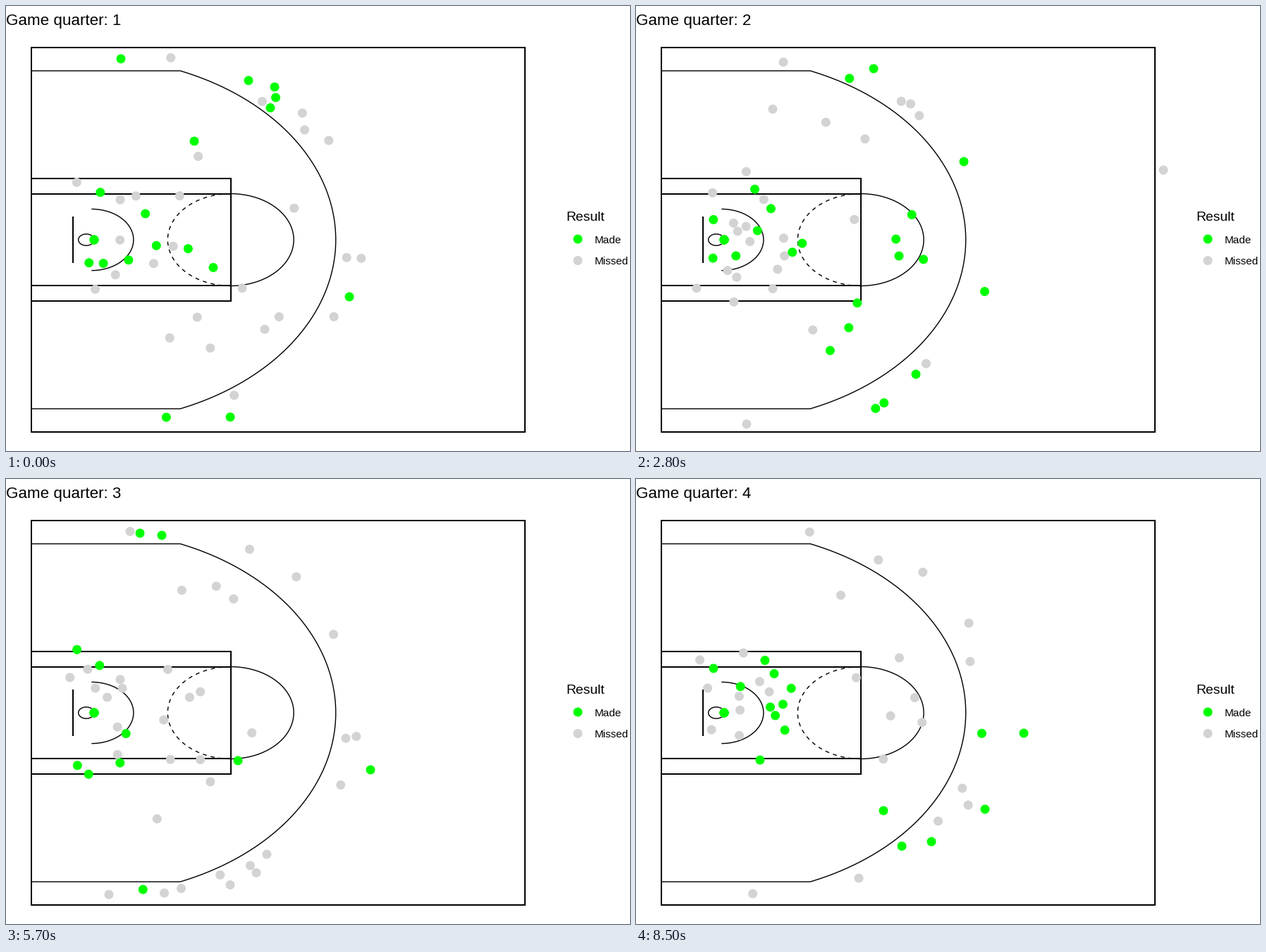
Write a matplotlib script that moves like this. It is 885x632 px and loops after 10 s.

```python
import numpy as np
import matplotlib.pyplot as plt
from matplotlib.animation import FuncAnimation

W, H, DPI = 885, 632, 128
PT = 72 / DPI                      # points per pixel
GREEN, GREY = (0, 1, 0), (211 / 255,) * 3
DOT_R, DOT_EDGE = 6.0, 0.945 * PT

FRAMES, FADE = 100, 14
STARTS = (14, 43, 71)              # last still frame before each fade

HOOP, THREE = 5.25, 23.75          # feet
rng = np.random.default_rng(23)


def to_px(x, y):
    """Feet from the baseline and the court's axis to stage pixels."""
    return 35.6 + 14.9 * np.asarray(x), 332.03 - 10.908 * np.asarray(y)


def ring(r0, r1, a0, a1):
    """Zone around the hoop between two radii and two angles."""
    def pick():
        r, a = rng.uniform(r0, r1), np.radians(rng.uniform(a0, a1))
        return to_px(HOOP + r * np.cos(a), r * np.sin(a))
    return pick


def corner(side):
    return lambda: to_px(rng.uniform(5, 14.5), side * rng.uniform(22.8, 24))


ZONES = [ring(2.2, 8.5, -110, 110), ring(9, 21, -75, 75),
         ring(24.5, 27, 15, 60), ring(24.5, 27, -60, -5),
         corner(1), corner(-1)]


def scatter_shots(counts, taken, gap=12):
    """Random shots for each zone, kept clear of those already taken."""
    shots = []
    for pick, count in zip(ZONES, counts):
        for _ in range(count):
            p = pick()
            while any(np.hypot(p[0] - q[0], p[1] - q[1]) < gap for q in taken):
                p = pick()
            taken.append(p)
            shots.append(p)
    return shots


def quarter(key_made, made, missed, rim_shots=6, key_missed=()):
    """Positions and colours; counts per zone, with a few fixed key shots."""
    rim = to_px(6, 0)
    taken = [rim, *key_made, *key_missed]
    hits = list(key_made) + scatter_shots(made, taken) + [rim] * rim_shots
    misses = list(key_missed) + scatter_shots(missed, taken)
    return np.array(misses + hits), np.array([GREY] * len(misses) + [GREEN] * len(hits))


quarters = [
    quarter([(163, 75), (381, 115), (267, 192), (487, 413)],
            (6, 2, 3, 1, 0, 1), (8, 9, 4, 4, 1, 0), rim_shots=3),
    quarter([(337, 89), (465, 221), (373, 355), (397, 523)],
            (8, 6, 1, 3, 0, 0), (14, 6, 3, 1, 1, 1), key_missed=[(748, 233)]),
    quarter([(190, 77), (221, 80), (329, 400), (517, 413)],
            (6, 0, 0, 0, 0, 1), (9, 11, 3, 8, 1, 3)),
    quarter([(351, 471), (550, 361), (495, 469), (419, 515)],
            (10, 0, 0, 2, 0, 0), (9, 7, 4, 4, 1, 1)),
]

plt.rcParams["font.family"] = "Liberation Sans"
fig = plt.figure(figsize=(W / DPI, H / DPI), dpi=DPI, facecolor="white")
ax = fig.add_axes([0, 0, 1, 1])
ax.set(xlim=(0, W), ylim=(H, 0))
ax.axis("off")


def line(x, y, width=2.0, style="-", snap=True):
    ax.plot(*to_px(x, y), color="black", ls=style, lw=width * PT, snap=snap,
            solid_capstyle="butt", dash_capstyle="butt",
            solid_joinstyle="miter", zorder=1)


def arc_points(cx, r, start, end):
    a = np.radians(np.linspace(start, end, 300))
    return cx + r * np.cos(a), r * np.sin(a)


def arc(cx, r, start, end, style="-"):
    line(*arc_points(cx, r, start, end), 1.42, style, False)


# Straight markings
line([0, 47, 47, 0, 0], [25, 25, -25, -25, 25.08])
line([0, 19, 19, 0], [8, 8, -8, -8])
for side in (6, -6):
    line([0, 19], [side, side])
line([4, 4], [3, -3])

# Hoop, restricted area and free-throw circle
arc(HOOP, 0.75, 0, 360)
arc(5.75, 4, -90, 90)
arc(19, 6, -90, 90)
arc(19, 6, 90, 270, (0, (4, 4)))

# Three-point line: straight corners joined by the arc
edge = np.degrees(np.arcsin(22 / THREE))
bow_x, bow_y = arc_points(HOOP, THREE, edge, -edge)
line(np.r_[0, bow_x, 0], np.r_[22, bow_y, -22], 1.42, snap=False)


def dots(pos, rgb, z):
    x, y = np.transpose(pos)
    return ax.scatter(x, y, s=(2 * DOT_R * PT) ** 2, c=rgb, edgecolors=rgb,
                      linewidths=DOT_EDGE, zorder=z)


def label(x, y, text, size):
    return ax.text(x, y, text, fontsize=size * PT, va="baseline", color="black")


title = label(0, 27, "", 22.4)
label(794.7, 305, "Result", 19.3)
label(834.7, 337, "Made", 15.2)
label(834.7, 367, "Missed", 15.2)
dots([(811, 331), (811, 361.5)], [GREEN, GREY], 2)
shots = dots(*quarters[0], 3)


def update(i):
    shown, name, alpha = 0, 1, 1.0
    for n, start in enumerate(STARTS):
        step = i - start
        if step >= FADE:
            shown = n + 1
        elif step > 0:
            alpha = 1 - step / FADE
        if step >= FADE // 2:
            name = n + 2
    pos, rgb = quarters[shown]
    rgba = np.c_[rgb, np.full(len(rgb), alpha)]
    shots.set_offsets(pos)
    shots.set_facecolors(rgba)
    shots.set_edgecolors(rgba)
    title.set_text(f"Game quarter: {name}")
    return shots, title


anim = FuncAnimation(fig, update, frames=FRAMES, interval=100,
                     init_func=lambda: update(0), repeat=True, repeat_delay=0)
plt.show()
```
